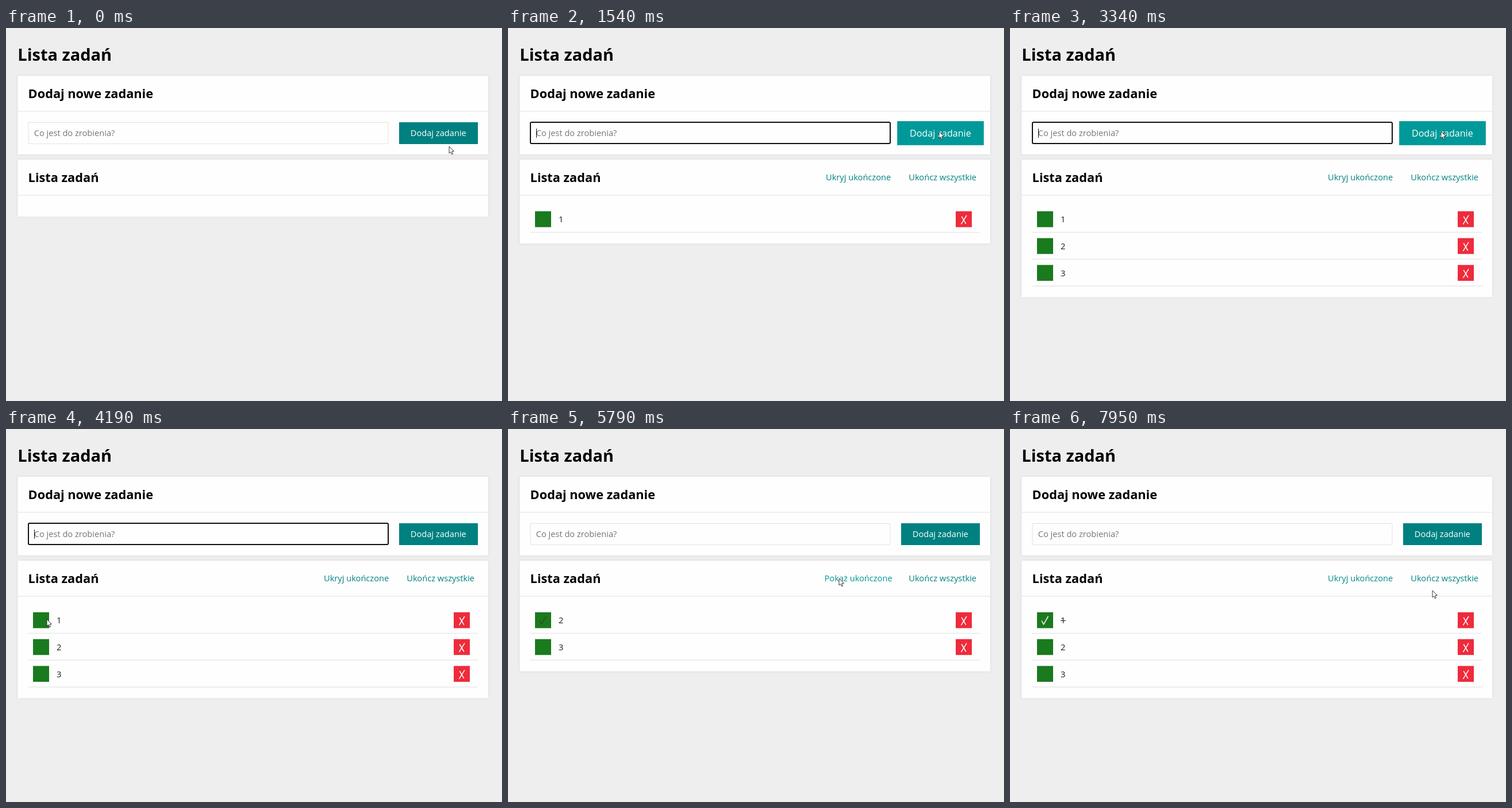
Animation of 863x649 px, one loop 8000 ms. Source, as an HTML page with a canvas:

```html
<!DOCTYPE html>
<html lang="pl">
<head>
<meta charset="utf-8">
<title>Lista zadań</title>
<style>
html, body { margin: 0; width: 100%; height: 100%; overflow: hidden; background: #eee; }
canvas { display: block; }
</style>
</head>
<body>
<canvas id="stage" width="863" height="649"></canvas>
<script>
const ctx = document.getElementById('stage').getContext('2d');
const LOOP = 8000;
const BODY = 14.64, H2 = BODY * 1.485, H1 = BODY * 1.98;
const ROW = 46.7;
const LEFT = 38.6, RIGHT = 820.7;

// Moments of the story, in ms.
const FOCUS = 400, BLUR = 4450, CHECK = 4500, HIDE = 5740, SHOW = 6960;
const BUTTON_HOVER = [270, 3720], LINK_HOVER = [5420, 7780];
const tasks = [
  { label: '1', typed: 840, added: 1300 },
  { label: '2', typed: 1810, added: 2170 },
  { label: '3', typed: 2540, added: 3080 }
];

// Each move bends towards `via`, or runs straight without it.
const START = [771, 206];
const moves = [
  { from: 50, until: 420, to: [755, 189] },
  { from: 600, until: 840, to: [750, 180] },
  { from: 3450, until: 4190, to: [71, 331], via: [221, 562] },
  { from: 4650, until: 5450, to: [576, 260], via: [660, 650] },
  { from: 7700, until: 7950, to: [735, 281], via: [660, 362] }
];

const clamp = v => Math.min(1, Math.max(0, v));
const smooth = v => v * v * (3 - 2 * v);
const ramp = (t, start, duration = 300) => smooth(clamp((t - start) / duration));
const hover = (t, [enter, leave]) => ramp(t, enter) - ramp(t, leave);
const pulse = (t, peak) => Math.exp(-(((t - peak) / 90) ** 2));
const between = (t, start, end) => t >= start && t < end;

function teal(v) {
  return `rgb(0, ${Math.round(v)}, ${Math.round(v)})`;
}

function text(str, x, y, { size = BODY, weight = 400, color = '#000', align = 'left' } = {}) {
  ctx.font = `${weight} ${size}px "Open Sans", sans-serif`;
  ctx.fillStyle = color;
  ctx.textAlign = align;
  ctx.fillText(str, x, y);
}

function rect(x, y, w, h, color) {
  ctx.fillStyle = color;
  ctx.fillRect(x, y, w, h);
}

function box(x, y, w, h, color, width) {
  ctx.strokeStyle = color;
  ctx.lineWidth = width;
  ctx.beginPath();
  ctx.roundRect(x, y, w, h, width);
  ctx.stroke();
}

function polyline(color, ...points) {
  ctx.strokeStyle = color;
  ctx.lineWidth = 1.5;
  ctx.beginPath();
  for (const [x, y] of points) ctx.lineTo(x, y);
  ctx.stroke();
}

function panel(title, top, bottom) {
  ctx.save();
  ctx.shadowColor = 'rgba(0, 0, 0, .08)';
  ctx.shadowBlur = 5;
  rect(20.4, top, 818.6, bottom - top, '#fefefe');
  ctx.restore();
  rect(20.4, top + 61, 818.6, 1.5, '#ebebeb');
  text(title, LEFT, top + 38.4, { size: H2, weight: 700 });
}

function input(t) {
  const focused = between(t, FOCUS, BLUR);
  const draft = tasks.find(task => between(t, task.typed, task.added));
  if (focused) box(39, 164, 626, 37, '#101010', 2);
  else box(39, 164.4, 626, 36.8, '#e4e4e4', 1.1);
  if (draft) text(draft.label, 48.7, 188.3);
  else text('Co jest do zrobienia?', 48.7, 188.3, { color: '#757575' });
  if (focused) rect(draft ? 57 : 49, 175, 1, 16, '#111');
}

function addButton(t) {
  const hovered = hover(t, BUTTON_HOVER);
  const pressed = [FOCUS + 30, ...tasks.map(task => task.added)]
    .reduce((sum, peak) => sum + pulse(t, peak), 0);
  const scale = 1 + .1 * hovered;
  ctx.save();
  ctx.translate(752.5, 183);
  ctx.scale(scale, scale);
  rect(-68.5, -19, 137, 38, teal(128 + 25 * hovered + 20 * pressed));
  text('Dodaj zadanie', -.2, 5.2, { color: '#fff', align: 'center' });
  ctx.restore();
}

function checkMark(color) {
  polyline(color, [55, 24], [58.6, 30.2], [66.5, 16.2]);
}

function row(label, index, done, ghost) {
  ctx.save();
  ctx.translate(0, 309.6 + ROW * index);
  rect(47, 9.3, 28, 27.6, '#1a7a1e');
  if (done) checkMark('#fff');
  else if (ghost > 0) checkMark(`rgba(60, 60, 20, ${ghost})`);
  text(label, 88, 28.6, { color: '#1c1c1c' });
  if (done) rect(88, 23.2, 9, 1.1, '#1c1c1c');
  rect(779, 9.3, 28, 27.6, '#ee2b3b');
  polyline('#fff', [789.2, 18.2], [796.8, 31.2]);
  polyline('#fff', [798, 16.4], [788.4, 31.8]);
  rect(LEFT, 45.2, RIGHT - LEFT, 1.5, '#e9e9e9');
  ctx.restore();
}

function list(t) {
  const hidden = between(t, HIDE, SHOW);
  const shown = tasks.filter((task, i) => t >= task.added && !(hidden && i === 0));
  panel('Lista zadań', 229.2, 328.2 + ROW * shown.length);
  if (!shown.length) return;

  text(hidden ? 'Pokaż ukończone' : 'Ukryj ukończone', 609.6, 265,
    { color: teal(128 + 22 * hover(t, LINK_HOVER)), align: 'center' });
  text('Ukończ wszystkie', 756.2, 265, { color: teal(128), align: 'center' });

  shown.forEach((task, i) => {
    const done = task === tasks[0] && t >= CHECK;
    const ghost = hidden && i === 0 ? .75 * (1 - ramp(t, HIDE)) : 0;
    row(task.label, i, done, ghost);
  });
}

function cursorAt(t) {
  let at = START;
  for (const { from, until, to, via = to } of moves) {
    if (t < from) break;
    const u = ramp(t, from, until - from), v = 1 - u;
    at = at.map((a, i) => v * v * a + 2 * u * v * via[i] + u * u * to[i]);
  }
  return at;
}

function cursor(t) {
  ctx.save();
  ctx.translate(...cursorAt(t));
  const arrow = new Path2D('M0 0V12L2.7 9.6L4.6 13.8L6.5 13L4.8 8.8L8.3 8.4Z');
  ctx.fillStyle = '#fff';
  ctx.fill(arrow);
  ctx.strokeStyle = '#222';
  ctx.lineWidth = .9;
  ctx.stroke(arrow);
  ctx.restore();
}

function draw() {
  const t = performance.now() % LOOP;
  rect(0, 0, 863, 649, '#eee');
  text('Lista zadań', 20.3, 57, { size: H1, weight: 700 });
  panel('Dodaj nowe zadanie', 83.2, 219.8);
  input(t);
  addButton(t);
  list(t);
  cursor(t);
  requestAnimationFrame(draw);
}
draw();
</script>
</body>
</html>
```
